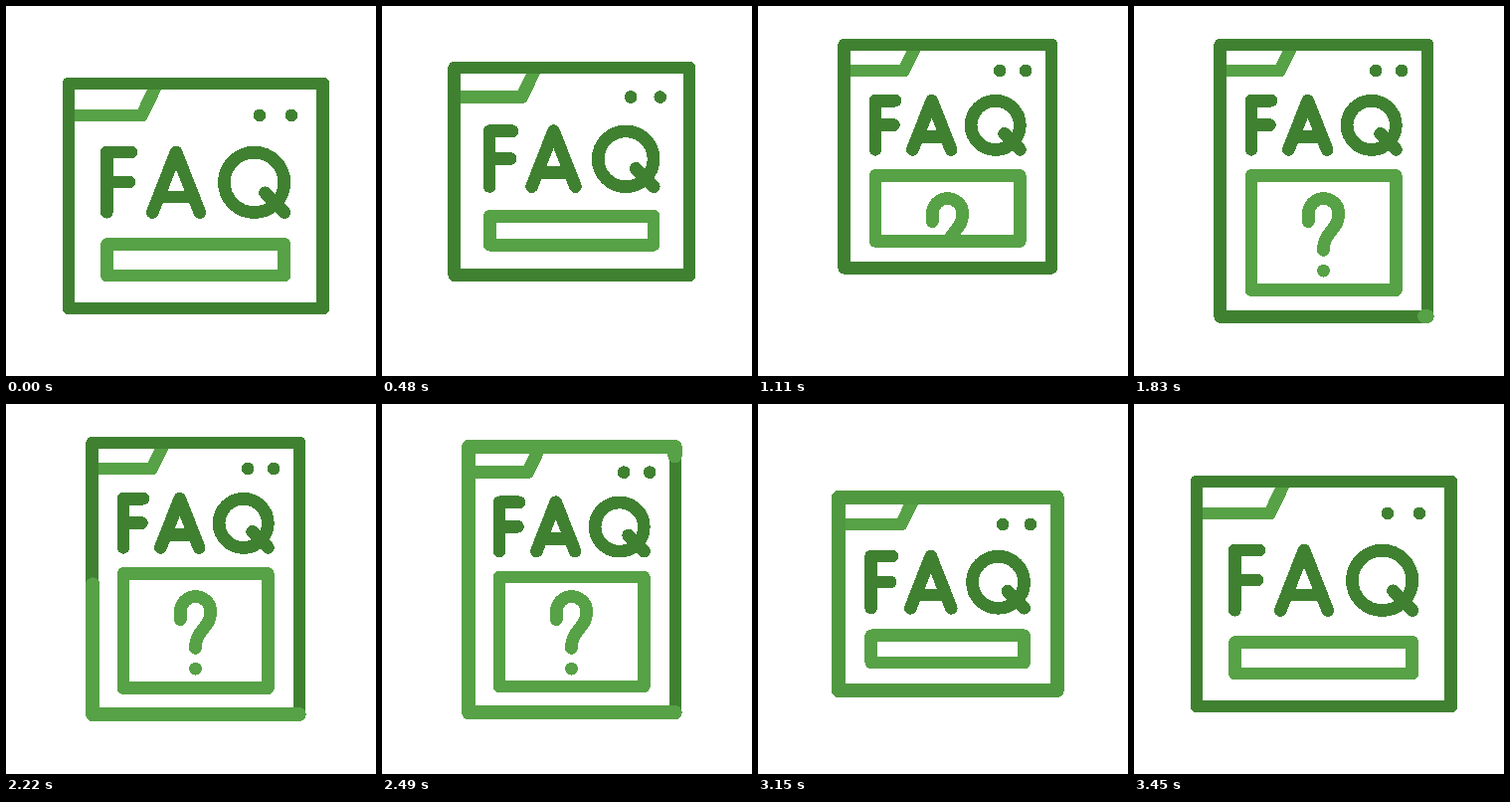
Animation, 372 px wide and 372 px high, one loop 3600 ms. Source, as an HTML page:

```html
<!DOCTYPE html>
<html lang="en">
<head>
<meta charset="utf-8">
<title>FAQ window</title>
<style>
  html, body { margin: 0; width: 100%; height: 100%; overflow: hidden; background: #fff; }
  svg { display: block; width: 100%; height: 100%; }
  svg * { stroke-linecap: round; stroke-linejoin: round; shape-rendering: crispEdges; }
  .dark { stroke: #3f8131; }
  .light { stroke: #57a146; }
</style>
</head>
<body>
<svg viewBox="0 0 372 372" fill="none" stroke-width="12.7">
  <clipPath id="window"><path id="opening"/></clipPath>
  <g id="content">
    <path class="light" d="M66 110H136.5L152 78"/>
    <g class="dark">
      <path d="M255 110h0M287 110h0"/>
      <path d="M126 147H101.3V207.3M101.3 177H124"/>
      <path d="M147.3 207.5L171 147L194.8 207.5M153.5 192H188.5"/>
      <circle cx="249.6" cy="177.4" r="30.2"/>
      <path d="M260.5 187.7L280 207.5"/>
    </g>
  </g>
  <g id="question" class="light" clip-path="url(#window)">
    <path d="M175.4 216.7V208.7A15.2 15.2 0 0 1 205.8 208.7C205.8 226 190.5 226 190.5 245.5M190.5 266.2h0"/>
  </g>
  <path id="box" class="light"/>
  <path id="frame" class="dark"/>
  <path id="glow" pathLength="1"/>
</svg>
<script>
  const LOOP = 3600, STEP = 30, CENTER = 191, SMALL = 0.8145, GROWTH = 89.5, STROKE = 12.7;
  const LIGHT = [87, 161, 70], DARK = [63, 129, 49];
  const $ = id => document.getElementById(id);

  const ease = (t, from, to) => {
    const p = Math.min(1, Math.max(0, (t - from) / (to - from)));
    return p * p * (3 - 2 * p);
  };

  // Starts and ends in the lower right corner, running clockwise.
  const outline = (l, t, r, b, inset = 0) =>
    `M${r - inset} ${b - inset}H${l + inset}V${t + inset}H${r - inset}V${b - inset}`;

  function draw(t) {
    const shrink = ease(t, 150, 900) - ease(t, 3000, 3450);
    const collapse = ease(t, 2400, 3000);
    const extra = GROWTH * (ease(t, 900, 1350) - collapse);
    const scale = 1 - (1 - SMALL) * shrink;
    const middle = CENTER - 60 * (ease(t, 150, 900) - collapse);
    const x = v => CENTER + (v - CENTER) * scale;
    const y = v => middle + (v - CENTER) * scale;

    $('content').setAttribute('transform',
      `translate(${CENTER} ${middle}) scale(${scale}) translate(${-CENTER} ${-CENTER})`);
    $('content').setAttribute('stroke-width', STROKE / scale);

    const frame = [x(63), y(78), x(318.7), y(304) + extra];
    const box = outline(x(101.5), y(239.5), x(279.8), y(271) + extra);
    $('frame').setAttribute('d', outline(...frame) + 'Z');
    $('box').setAttribute('d', box + 'Z');
    $('opening').setAttribute('d', box);
    $('question').style.display = t >= 900 && t < 3000 ? '' : 'none';

    const drawn = ease(t, 1800, 2850);
    const fade = ease(t, 3000, 3450);
    const color = LIGHT.map((c, i) => Math.round(c + (DARK[i] - c) * fade));
    const glow = $('glow');
    glow.style.display = drawn > 0 ? '' : 'none';
    glow.setAttribute('d', outline(...frame, 0.5 * shrink));
    glow.setAttribute('stroke-width', STROKE + 1.6 * shrink);
    glow.setAttribute('stroke-dasharray', drawn < 1 ? `${drawn} 2` : 'none');
    glow.setAttribute('stroke', `rgb(${color})`);
  }

  function tick() {
    const t = performance.now() % LOOP;
    draw(Math.floor(t / STEP) * STEP);
    requestAnimationFrame(tick);
  }
  tick();
</script>
</body>
</html>
```
